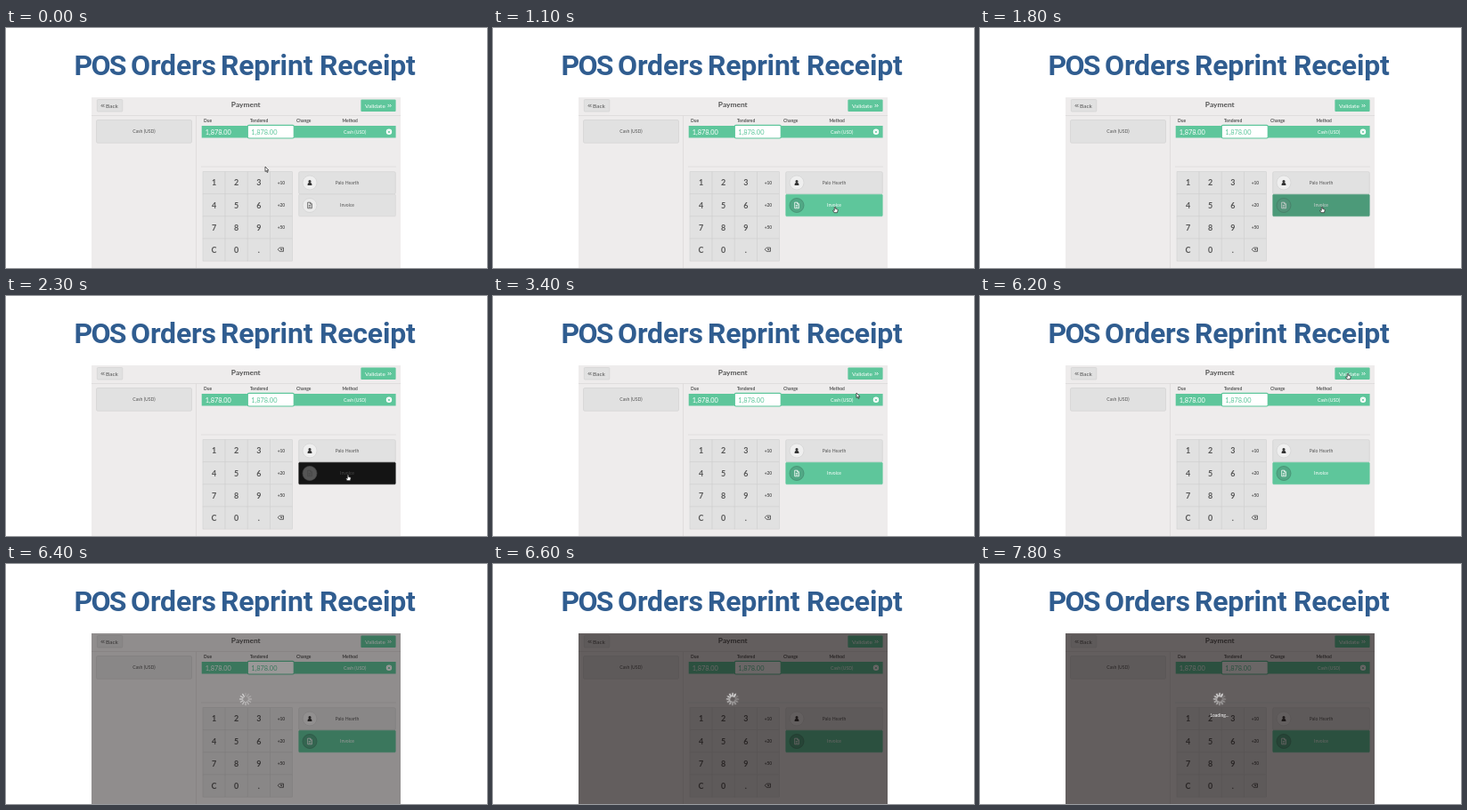
Animation of 540 by 270 pixels, one loop 8 s. Source, as an HTML page:

```html
<!DOCTYPE html>
<html lang="en">
<head>
<meta charset="utf-8">
<title>POS Orders Reprint Receipt</title>
<style>
  html, body { margin: 0; width: 100%; height: 100%; overflow: hidden; background: #fff; }
  svg { display: block; width: 540px; height: 270px; }
  text { font-family: Lato, "Open Sans", sans-serif; font-size: 5.1px; fill: #555; }
  .title { font: 600 32px Roboto, "Open Sans", sans-serif; letter-spacing: -.2px; fill: #305d90; }
  .title .caps { letter-spacing: -1.7px; }
  .mid { text-anchor: middle; }
  .head { font-weight: 700; font-size: 4.9px; }
  .heading { font-weight: 700; font-size: 8.4px; }
  .button { font-size: 6.5px; }
  .amount { font-size: 7.4px; }
  .key { font-weight: 700; font-size: 9px; text-anchor: middle; }
  .small { font-size: 4.8px; }
  .white { fill: #fff; }
  .green { fill: #5ec69b; }
  .box { fill: #e1e1e1; stroke: #cfcfcf; stroke-width: .6; }
  .line { fill: none; stroke: #dcdada; stroke-width: .8; }
  .chevron { fill: none; stroke: #555; stroke-width: .9; }

  .bg, .ring, .ink, .arrow, .hand, .shade, .spin, .wheel, .wait {
    animation: 8s step-end infinite;
  }

  /* Invoice button: highlight, press, highlight again */
  .bg { animation-name: bg; }
  @keyframes bg {
    0% { fill: #e1e1e1; stroke: #cfcfcf; }
    8.75% { fill: #e1e1e1; stroke: #cfcfcf; animation-timing-function: steps(4); }
    13.75% { fill: #5ec69b; stroke: #5ec69b; }
    21.25% { fill: #5ec69b; stroke: #5ec69b; animation-timing-function: steps(4); }
    26.25% { fill: #141414; stroke: #141414; }
    30%, 100% { fill: #5ec69b; stroke: #5ec69b; }
  }
  .ring { animation-name: ring; }
  @keyframes ring {
    0% { fill: #ececec; stroke: #d2d2d2; }
    8.75% { fill: #ececec; stroke: #d2d2d2; animation-timing-function: steps(4); }
    13.75% { fill: #51a885; stroke: #44886d; }
    21.25% { fill: #51a885; stroke: #44886d; animation-timing-function: steps(4); }
    26.25% { fill: #555; stroke: #4a4a4a; }
    30%, 100% { fill: #51a885; stroke: #44886d; }
  }
  .ink { animation-name: ink; }
  @keyframes ink {
    0% { color: #555; }
    8.75% { color: #555; animation-timing-function: steps(4); }
    13.75% { color: #fff; }
    21.25% { color: #fff; animation-timing-function: steps(4); }
    26.25% { color: #484848; }
    30%, 100% { color: #fff; }
  }
  .ink text { fill: currentColor; }
  .ink path { stroke: currentColor; }

  .arrow { animation-name: arrow; }
  @keyframes arrow {
    0% { transform: translate(291px, 156px); opacity: 1; }
    1.25% { transform: translate(317px, 171px); opacity: 1; }
    2.5% { opacity: 0; }
    38.75% { transform: translate(400px, 130px); opacity: 1; }
    41.25% { transform: translate(404px, 120px); opacity: 1; }
    42.5% { transform: translate(408px, 109px); opacity: 1; }
    43.75% { transform: translate(411px, 100.5px); opacity: 1; }
    46.25%, 100% { opacity: 0; }
  }
  .hand { animation-name: hand; }
  @keyframes hand {
    0% { opacity: 0; }
    2.5% { transform: translate(358px, 192px); opacity: 1; }
    3.75% { transform: translate(392px, 202px); opacity: 1; }
    5% { transform: translate(384px, 201px); opacity: 1; }
    38.75% { opacity: 0; }
    46.25% { transform: translate(412.5px, 91px); opacity: 1; }
    47.5% { transform: translate(413px, 87px); opacity: 1; }
    80%, 100% { opacity: 0; }
  }

  .shade { animation-name: shade; fill: #0c0505; }
  @keyframes shade {
    0% { opacity: 0; }
    80% { opacity: .41; }
    82.5%, 100% { opacity: .61; }
  }
  .spin { animation-name: spin; }
  @keyframes spin {
    0% { opacity: 0; }
    80% { opacity: .6; }
    82.5%, 100% { opacity: 1; }
  }
  .wait { animation-name: wait; }
  @keyframes wait { 0% { opacity: 0; } 91.25%, 100% { opacity: 1; } }
  .wheel { animation-name: wheel; }
  @keyframes wheel {
    0%, 80% { transform: rotate(0deg); }
    82.5% { transform: rotate(60deg); }
    85% { transform: rotate(120deg); }
    86.25% { transform: rotate(150deg); }
    87.5% { transform: rotate(180deg); }
    88.75% { transform: rotate(210deg); }
    91.25% { transform: rotate(270deg); }
    93.75% { transform: rotate(330deg); }
    95% { transform: rotate(360deg); }
    96.25% { transform: rotate(390deg); }
    97.5%, 100% { transform: rotate(420deg); }
  }
</style>
</head>
<body>
<svg viewBox="0 0 540 270">
  <text class="title" y="53"><tspan class="caps" x="76.5">POS</tspan><tspan x="140">Orders</tspan><tspan x="241">Reprint</tspan><tspan x="352">Receipt</tspan></text>

  <rect x="96" y="78" width="347" height="192" fill="#eeecec"/>
  <path class="line" d="M96 98.500H443M213.500 98.500V270M219 156H438"/>

  <!-- Top bar -->
  <rect class="box" x="102.300" y="80.500" width="28.500" height="13.500" rx="1"/>
  <path class="chevron" d="M108.400 85.900l-1.400 1.500 1.400 1.500M110.400 85.900l-1.400 1.500 1.400 1.500"/>
  <text class="button" x="112" y="89.700">Back</text>
  <text class="heading mid" x="269.300" y="89.300">Payment</text>
  <rect class="green" x="398.400" y="80.500" width="39.200" height="13.500" rx="1"/>
  <text class="button white" x="403" y="89.700">Validate</text>
  <path class="chevron" style="stroke:#fff" d="M428.700 85.900l1.400 1.500-1.400 1.500M430.900 85.900l1.400 1.500-1.400 1.500"/>

  <!-- Payment method and line -->
  <rect class="box" x="101.500" y="103.500" width="107" height="25.800" rx="1.500"/>
  <text class="mid" x="155" y="118.400">Cash (USD)</text>
  <text class="head" x="222" y="106">Due</text>
  <text class="head" x="274" y="106">Tendered</text>
  <text class="head" x="326" y="106">Change</text>
  <text class="head" x="377.500" y="106">Method</text>
  <rect class="green" x="219.700" y="110" width="217.900" height="13.500"/>
  <rect x="271.300" y="109.300" width="52" height="14.700" rx="1.500" fill="#fff" stroke="#5ec69b" stroke-width="1.200"/>
  <text class="amount white" x="223.700" y="119.500">1,878.00</text>
  <text class="amount green" x="275.300" y="119.500">1,878.00</text>
  <text class="white" x="379" y="118.500">Cash (USD)</text>
  <circle cx="430" cy="116.800" r="3.200" fill="#fff"/>
  <path d="M428.800 115.600l2.400 2.400M431.200 115.600l-2.400 2.400" stroke="#5ec69b" stroke-width=".9"/>

  <g id="pad"></g>

  <!-- Customer -->
  <rect class="box" x="328.700" y="161.700" width="108.600" height="25" rx="1.500"/>
  <circle cx="341" cy="174" r="8" fill="#efefef" stroke="#d2d2d2" stroke-width=".7"/>
  <path d="M338.500 177q0-2.900 1.500-3h2q1.500.1 1.500 3z" fill="#333"/>
  <circle cx="341" cy="172.600" r="1.500" fill="#333"/>
  <text class="mid" x="383" y="175.900">Palo Hearth</text>

  <!-- Invoice -->
  <rect class="bg" x="328.700" y="187.200" width="108.600" height="24.600" rx="1" stroke-width=".5"/>
  <circle class="ring" cx="341" cy="199.500" r="8" stroke-width=".7"/>
  <g class="ink">
    <path d="M338.700 196.200h3l1.700 1.700v4.900h-4.700zM341.600 196.300v1.700h1.700M339.800 199.600h2.500M339.800 201.200h2.500" fill="none" stroke-width=".8"/>
    <text class="mid" x="383" y="201.300">Invoice</text>
  </g>

  <path class="arrow" d="M0 0V5.500L1.300 4.400 2.200 6.500 3.100 6.100 2.200 4.100H3.900Z" fill="#fff" stroke="#222" stroke-width=".7"/>
  <path class="hand" d="M-.7 3.500V.6Q0-.3.700.6V2.500L2.800 3Q3.300 3.200 3.100 4.200L2.500 6.700H-1.100L-2.400 4.300Q-1.900 3.500-.7 4.400Z" fill="#fff" stroke="#222" stroke-width=".7"/>

  <rect class="shade" x="96" y="78" width="347" height="192"/>
  <g class="spin"><g transform="translate(269 152)"><g class="wheel" id="wheel"></g></g></g>
  <text class="wait mid white" x="269" y="172">Loading...</text>
</svg>
<script>
  const NS = "http://www.w3.org/2000/svg";
  function add(parent, tag, attrs, label = "") {
    const el = document.createElementNS(NS, tag);
    for (const name in attrs) el.setAttribute(name, attrs[name]);
    el.textContent = label;
    parent.append(el);
  }

  const pad = document.getElementById("pad");
  const keys = ["1", "2", "3", "+10", "4", "5", "6", "+20", "7", "8", "9", "+50", "C", "0", ".", ""];
  const size = 25.1;
  keys.forEach((key, i) => {
    const x = 221 + (i % 4) * size;
    const y = 161.7 + Math.floor(i / 4) * size;
    const small = key.length > 1;
    add(pad, "rect", { class: "box", x, y, width: size, height: size });
    add(pad, "text", {
      class: small ? "key small" : "key",
      x: x + size / 2,
      y: y + size / 2 + (small ? 1.6 : 3.2)
    }, key);
  });
  // Backspace symbol
  add(pad, "path", {
    d: "M305.200 249.200l2-2.100h4.300v4.200h-4.300zM308.200 248.200l2 2M310.200 248.200l-2 2",
    fill: "none", stroke: "#555", "stroke-width": .9
  });

  const wheel = document.getElementById("wheel");
  for (let i = 0; i < 12; i++) {
    add(wheel, "path", {
      d: "M0-3.300V-6.500",
      transform: `rotate(${i * 30})`,
      stroke: "#fff", "stroke-width": 1.3, "stroke-linecap": "round",
      opacity: .25 + .75 * i / 11
    });
  }
</script>
</body>
</html>
```
